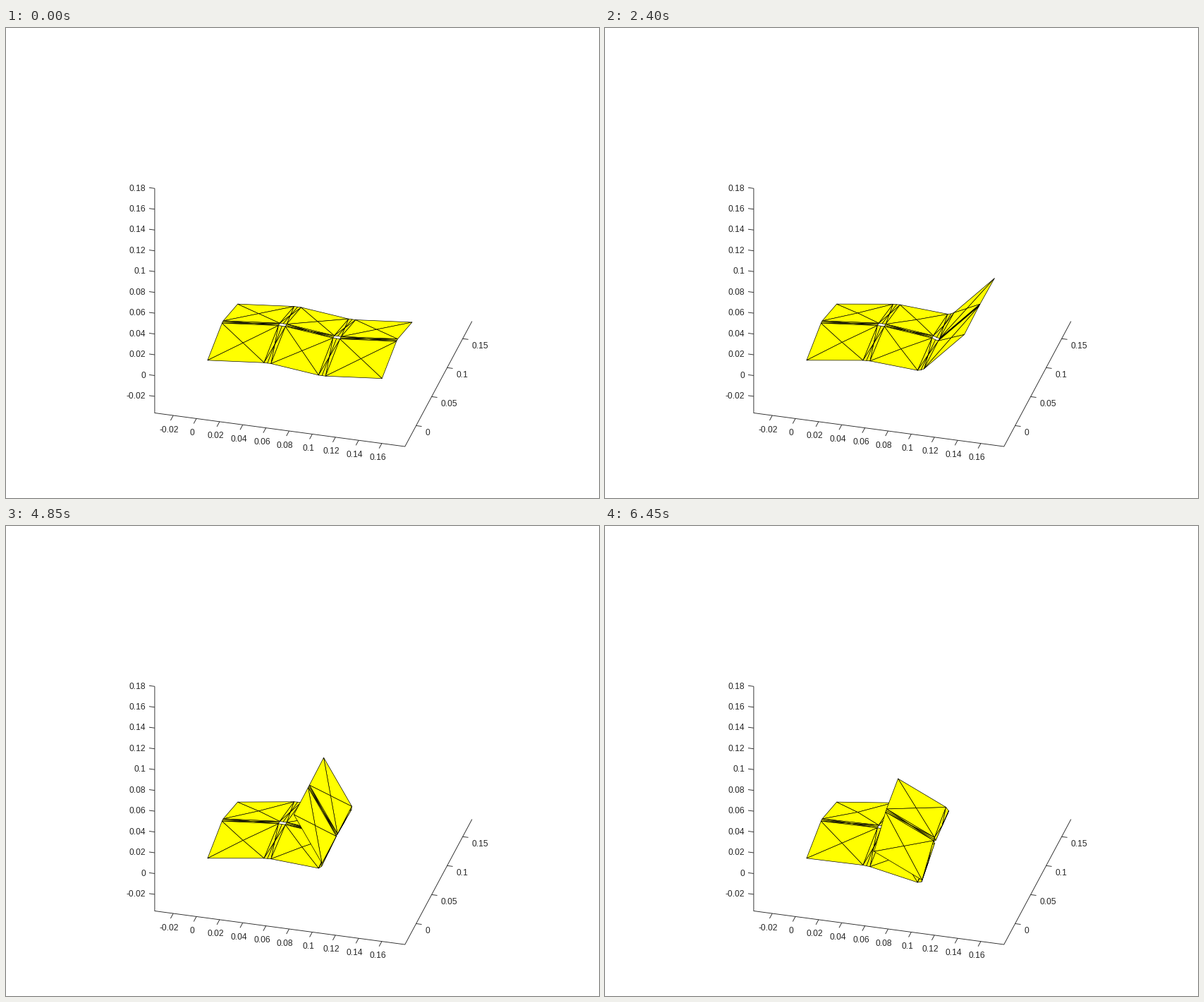
These frames come from a looping animation (841x666 px, 6.5 s). A matplotlib script:

```python
import numpy as np
import matplotlib.pyplot as plt
from matplotlib.animation import FuncAnimation
from matplotlib.collections import LineCollection, PolyCollection

W, H, DPI = 841, 666, 100
PX = 72 / DPI
FRAMES, INTERVAL, HOLD = 130, 50, 9
INK = "#262626"
LO, HI = -0.036, 0.18
SCALE, AZ, EL = 1701, np.radians(15), np.radians(30)

# Sheet of zigzag panels joined by narrow creases
LONG, MID, GAP = 0.0465, 0.0433, 0.006
ZIG = 0.0083
DEPTH, SEAM, RIDGE = 0.0465, 0.004, 0.0098
HINGE_X = LONG + GAP + MID
COLS = [0, LONG, LONG + GAP, HINGE_X, HINGE_X]
ROWS = [0, DEPTH, DEPTH + SEAM, 2 * DEPTH + SEAM]


def project(x, y, z):
    """Orthographic view of a 3D point or direction, in pixels."""
    right = x * np.cos(AZ) + y * np.sin(AZ)
    depth = x * np.sin(AZ) - y * np.cos(AZ)
    return SCALE * np.array([right, depth * np.sin(EL) - z * np.cos(EL)])


ORIGIN = np.array([210.4, 545]) - project(LO, LO, LO)


def point(x, y, z):
    return ORIGIN + project(x, y, z)


def spline(s, pts):
    """Cubic Hermite curve through the key points."""
    t, v = np.array(pts, float).T
    m = np.gradient(v, t)
    i = int(np.clip(np.searchsorted(t, s) - 1, 0, len(t) - 2))
    d = t[i + 1] - t[i]
    u = (s - t[i]) / d
    return ((1 + 2 * u) * (1 - u) ** 2 * v[i] + u * (1 - u) ** 2 * d * m[i]
            + u * u * (3 - 2 * u) * v[i + 1] + u * u * (u - 1) * d * m[i + 1])


# Step and angle in degrees of the right column
FOLD = [(0, 0), (20, 16.5), (39, 45.5), (68, 91), (98, 140), (110, 155.5), (120, 159.5)]


def panel(a, b, c, d):
    m = (a + b + c + d) / 4
    return [[a, b, m], [b, c, m], [c, d, m], [d, a, m]]


def crease(a, b, c, d, bulge=0):
    """Narrow strip with short ends ab and cd, bulging along its middle."""
    m, n = (a + b) / 2 + bulge, (c + d) / 2 + bulge
    q = (m + n) / 2
    return [[a, d, q], [b, c, q], [a, m, q], [m, b, q], [c, n, q], [n, d, q]]


def mesh(s):
    fold = np.radians(spline(s, FOLD))
    lift = np.sin(np.pi / 2 * min(s / 60, 1))
    sag = max((s - 70) / 50, 0) ** 3

    def node(r, c):
        x, y = COLS[c], ROWS[r]
        part = x / HINGE_X
        inner = r in (1, 2)
        z = RIDGE if inner else 0.0054 * lift * part
        z -= sag * part * (0.0143 - 0.126 * y)
        if c == 4:
            x += GAP * np.cos(fold / 2) + sag * 0.055 * (0.05 - y)
            z += GAP * np.sin(fold / 2) - sag * 0.03 * (0.1 - y)
            z -= inner * 0.0048 * lift * (1 - sag)
        return point(x, y + (ZIG if c in (1, 2) else 0), z)

    arm = project(LONG * np.cos(fold), ZIG, LONG * np.sin(fold))
    p = [[node(r, c) for c in range(5)] for r in range(4)]
    for row in p:
        row.append(row[4] + arm)
    bulge = GAP / 3 * np.tan(fold / 4) * project(np.sin(fold / 2), 0, -np.cos(fold / 2))

    tris = []
    for c in (0, 2, 4):
        if c:
            for r in (0, 2):
                tris += crease(p[r][c - 1], p[r][c], p[r + 1][c], p[r + 1][c - 1],
                               bulge if c == 4 else 0)
        for r in (2, 1, 0):
            build = crease if r == 1 else panel
            tris += build(p[r][c], p[r + 1][c], p[r + 1][c + 1], p[r][c + 1])
    return tris


fig = plt.figure(figsize=(W / DPI, H / DPI), dpi=DPI, facecolor="white")
ax = fig.add_axes([0, 0, 1, 1])
ax.set_xlim(-0.5, W - 0.5)
ax.set_ylim(H - 0.5, -0.5)
ax.axis("off")

lines = [[point(LO, LO, HI), point(LO, LO, LO), point(HI, LO, LO), point(HI, HI, LO)]]


def tick(pos, direction, shift, v, ha):
    lines.append([pos, pos + 8 * direction / np.hypot(*direction)])
    x, y = pos + shift
    ax.text(x, y, f"{v:.2f}" if round(v * 100) % 10 else f"{v:g}", ha=ha,
            va="center_baseline", color=INK, family="Liberation Sans", size=12 * PX)


for k in range(-1, 10):
    v = k / 50
    tick(point(LO, LO, v), project(-1, 0, 0), (-13, -1.3), v, "right")
    if k < 9:
        tick(point(v, LO, LO), project(0, -1, 0), (-5.8, 19), v, "center")
for k in range(4):
    v = k / 20
    tick(point(HI, v, LO), project(1, 0, 0), (13, 9.5), v, "left")
ax.add_collection(LineCollection(lines, colors=INK, linewidths=0.9 * PX))

sheet = PolyCollection(mesh(0), facecolors="#ffff00", edgecolors="black",
                       linewidths=0.67 * PX, joinstyle="round", zorder=3)
ax.add_collection(sheet)


def draw(i):
    sheet.set_verts(mesh(max(0, i - HOLD)))
    return [sheet]


anim = FuncAnimation(fig, draw, frames=FRAMES, interval=INTERVAL,
                     repeat=True, repeat_delay=0, blit=False)
plt.show()
```
